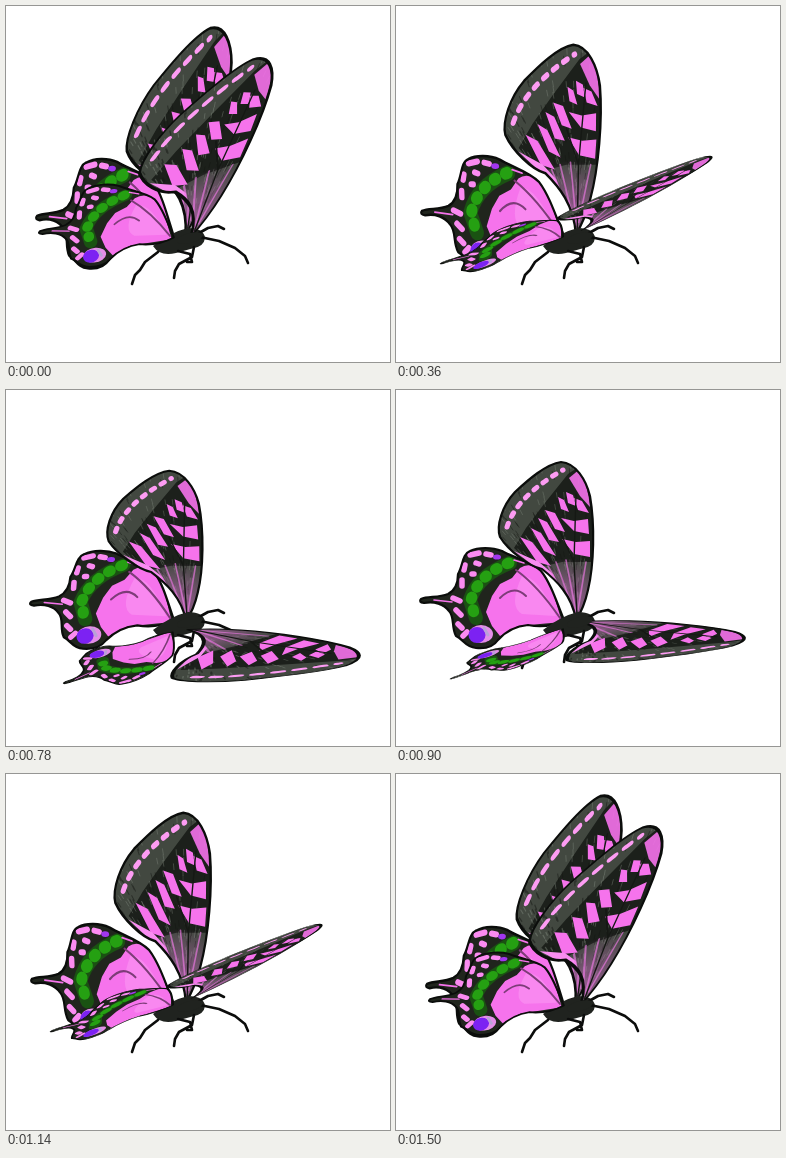
Animation, 384 px wide and 356 px high, one loop 1.56 s. Source, as an HTML page:

```html
<!DOCTYPE html>
<html>
<head>
<meta charset="utf-8">
<title>Butterfly</title>
<style>
  html, body { margin: 0; width: 100%; height: 100%; overflow: hidden; background: #fff; }
  svg { display: block; width: 384px; height: 356px; }
  .edge { fill: none; stroke: #0b0d0b; stroke-width: 2.2; vector-effect: non-scaling-stroke; stroke-linejoin: round; }
  .line { fill: none; stroke-linecap: round; stroke-linejoin: round; }
  .pink { fill: #f673ec; }
</style>
</head>
<body>
<svg viewBox="0 0 384 356">
  <defs>
    <path id="foreShape" d="M180 230C176 205 160 190 146 179C132 176 112 160 104 147C100 136 106 116 119 102C132 90 150 74 165 72C180 73 190 90 194 106C199 135 198 175 192 200Q188 218 180 230Z"/>
    <path id="hindShape" d="M168 230C160 210 154 192 145 181C134 171 116 167 106 161C96 157 82 157 74 161C66 164 67 176 62 184C62 193 60 200 52 204C42 208 32 206 25 209Q22 212 28 213C38 211 48 214 53 221C59 227 55 237 60 246C67 249 69 257 80 258C90 259 98 256 102 250C110 241 120 236 132 235Q152 239 168 230Z"/>
    <clipPath id="foreClip"><use href="#foreShape"/></clipPath>
    <clipPath id="hindClip"><use href="#hindShape"/></clipPath>
    <radialGradient id="rosy" gradientUnits="userSpaceOnUse" cx="172" cy="212" r="44">
      <stop offset="0" stop-color="#d46bcb" stop-opacity=".6"/>
      <stop offset="1" stop-color="#d46bcb" stop-opacity="0"/>
    </radialGradient>

    <g id="fore">
      <g clip-path="url(#foreClip)">
        <use href="#foreShape" fill="#424840"/>
        <path fill="#1c201b" d="M172 84L184 76 200 110 196 172 166 172 140 178 118 158 130 138 148 114Z"/>
        <path id="light" class="line" stroke="#8b9387" stroke-width=".8" opacity=".4"/>
        <path id="dark" class="line" stroke="#141713" stroke-width=".9" opacity=".5"/>
        <path fill="url(#rosy)" d="M120 160H200V235H150Z"/>
        <path class="pink" d="M173 88L184 79Q192 96 194 117L184 106Z" opacity=".9"/>
        <path class="pink" d="M170 102l7 3 3 11-8-3zM162 107l6 3 5 12-8-3zM178 108l8 3 7 12-11-3z
          M149 120L159 123 169 142 159 139ZM142 128L151 132 163 152 153 150ZM135 138L145 143 160 166 148 161Z
          M124 147L136 152 155 176 141 172ZM165 128L178 131 192 129 193 144 178 141Z
          M166 149L180 152 194 151 194 167 178 164Z"/>
        <path fill="#f98df1" d="M118 161L143 172 157 184 176 222 158 202 146 182Z"/>
        <path class="line" stroke="#ee79e5" stroke-width="1.6" opacity=".65" d="M160 172L178 222M170 170L180 222M190 172L182 220M152 176L176 220"/>
        <path class="line" stroke="#151814" stroke-width="1.4" d="M164 142L178 172 181 225M180 104L178 172"/>
        <path class="line" stroke="#fd9cf3" stroke-width="5" stroke-dasharray="4 7.6" d="M111 137Q121 106 167 80"/>
      </g>
      <use href="#foreShape" class="edge"/>
    </g>

    <g id="hind">
      <g clip-path="url(#hindClip)">
        <use href="#hindShape" fill="#20251d"/>
        <path class="pink" d="M152 186Q136 170 124 178L116 188 104 194 96 206 90 222 96 236 104 246 122 236 166 232Z"/>
        <path fill="#fb92f2" d="M126 186Q142 186 160 226L126 224Q112 216 126 186Z" opacity=".7"/>
        <path class="line" stroke="#7d3c78" stroke-width="2" d="M104 208Q118 194 130 206M120 180Q142 196 164 228"/>
        <path class="line" stroke="#1a5212" stroke-width="14" d="M114 173Q82 185 74 210L80 228"/>
        <path class="line" stroke="#25a012" stroke-width="11" stroke-dasharray="2 11" d="M113 173Q82 185 75 210L79 228"/>
        <path class="line" stroke="#fb8bf1" stroke-width="5.5" d="M74 165l9-2M90 164l5 1M69 175l-1 5M80 173l3 1M66 190l0 6M76 184l2 0M57 208l7 3M60 220l5 5M62 234l4 4M67 246l4-4"/>
        <path class="line" stroke="#f673ec" stroke-width="1.6" d="M38 210L56 212M118 170l10 3"/>
        <ellipse cx="101" cy="167" rx="4" ry="2.6" fill="#a236ee"/>
        <ellipse cx="85" cy="244" rx="12" ry="9" fill="#e48ee8"/>
        <ellipse cx="81" cy="245" rx="8.5" ry="8" fill="#7c22f2"/>
        <path class="line" stroke="#b9a2d8" stroke-width="3" d="M88 238l4 7"/>
      </g>
      <use href="#hindShape" class="edge"/>
    </g>
  </defs>

  <use id="farHind" href="#hind"/>
  <use id="farFore" href="#fore"/>
  <path fill="#20231f" d="M147 240Q165 226 182 222Q198 222 199 232Q198 240 188 242L170 247Q154 251 147 240Z"/>
  <path class="line" stroke="#0c0d0c" stroke-width="2.6" d="M152 246L139 256 134 264 129 269 126 278M188 241L186 251 173 258 169 265 168 272M172 245L184 248 186 256 181 256M194 231L213 235 229 242 239 250 242 257M193 227L202 222 212 220 218 223"/>
  <use id="nearHind" href="#hind"/>
  <use id="nearFore" href="#fore"/>
  <ellipse cx="184" cy="232" rx="13" ry="5" fill="#20231f" transform="rotate(-14 184 232)"/>
</svg>
<script>
const STEP = 60, COUNT = 26;
const $ = id => document.getElementById(id);
const ease = p => (1 - Math.cos(Math.PI * p / 12.5)) / 2;
const keys = [0, 4, 6, 10].map(ease);

// Each pose is three points: wing root, far end, rear corner.
const foreRest = [180, 228, 180, 78, 103, 138];
const hindRest = [165, 228, 24, 210, 85, 158];
const wings = [
  ['farFore', foreRest, [
    [180, 226, 218, 25, 122, 133], [180, 226, 203, 34, 114, 118],
    [180, 226, 192, 46, 109, 118], foreRest]],
  ['farHind', hindRest, [
    [165, 228, 30, 211, 91, 153], [165, 228, 27, 208, 88, 150],
    [165, 228, 25, 206, 83, 150], hindRest]],
  ['nearFore', foreRest, [
    [186, 228, 262, 54, 137, 157], [187, 227, 290, 97, 152, 181],
    [188, 223, 315, 150, 169, 207], [186, 232, 349, 250, 180, 272]]],
  ['nearHind', hindRest, [
    [165, 230, 33, 226, 93, 179], [165, 230, 40, 239, 106, 197],
    [165, 231, 45, 257, 115, 219], [165, 240, 55, 289, 125, 276]]],
];

// Smooth curve through the four poses
function blend(poses, x) {
  const weights = keys.map((a, i) =>
    keys.reduce((w, b, j) => i === j ? w : w * (x - b) / (a - b), 1));
  return poses[0].map((_, n) => poses.reduce((sum, pose, i) => sum + pose[n] * weights[i], 0));
}

const basis = ([x, y, ax, ay, bx, by]) => new DOMMatrix([ax - x, ay - y, bx - x, by - y, x, y]);

function addScales() {
  let seed = 7;
  const random = () => (seed = seed * 16807 % 2147483647) / 2147483647;
  for (const id of ['light', 'dark']) {
    let d = '';
    for (let i = 0; i < 170; i++) {
      const angle = -Math.PI * (.45 + random() * .4), r = 20 + random() * 140;
      const dx = Math.cos(angle), dy = Math.sin(angle);
      d += `M${(180 + r * dx).toFixed(1)} ${(228 + r * dy).toFixed(1)}l${(5 * dx).toFixed(1)} ${(5 * dy).toFixed(1)}`;
    }
    $(id).setAttribute('d', d);
  }
}

function draw() {
  const k = Math.floor(performance.now() / STEP) % COUNT;
  const x = ease(Math.min(k, COUNT - 1 - k));
  for (const [id, rest, poses] of wings) {
    const m = basis(blend(poses, x)).multiply(basis(rest).inverse());
    $(id).setAttribute('transform', `matrix(${[m.a, m.b, m.c, m.d, m.e, m.f]})`);
  }
  requestAnimationFrame(draw);
}

addScales();
draw();
</script>
</body>
</html>
```
